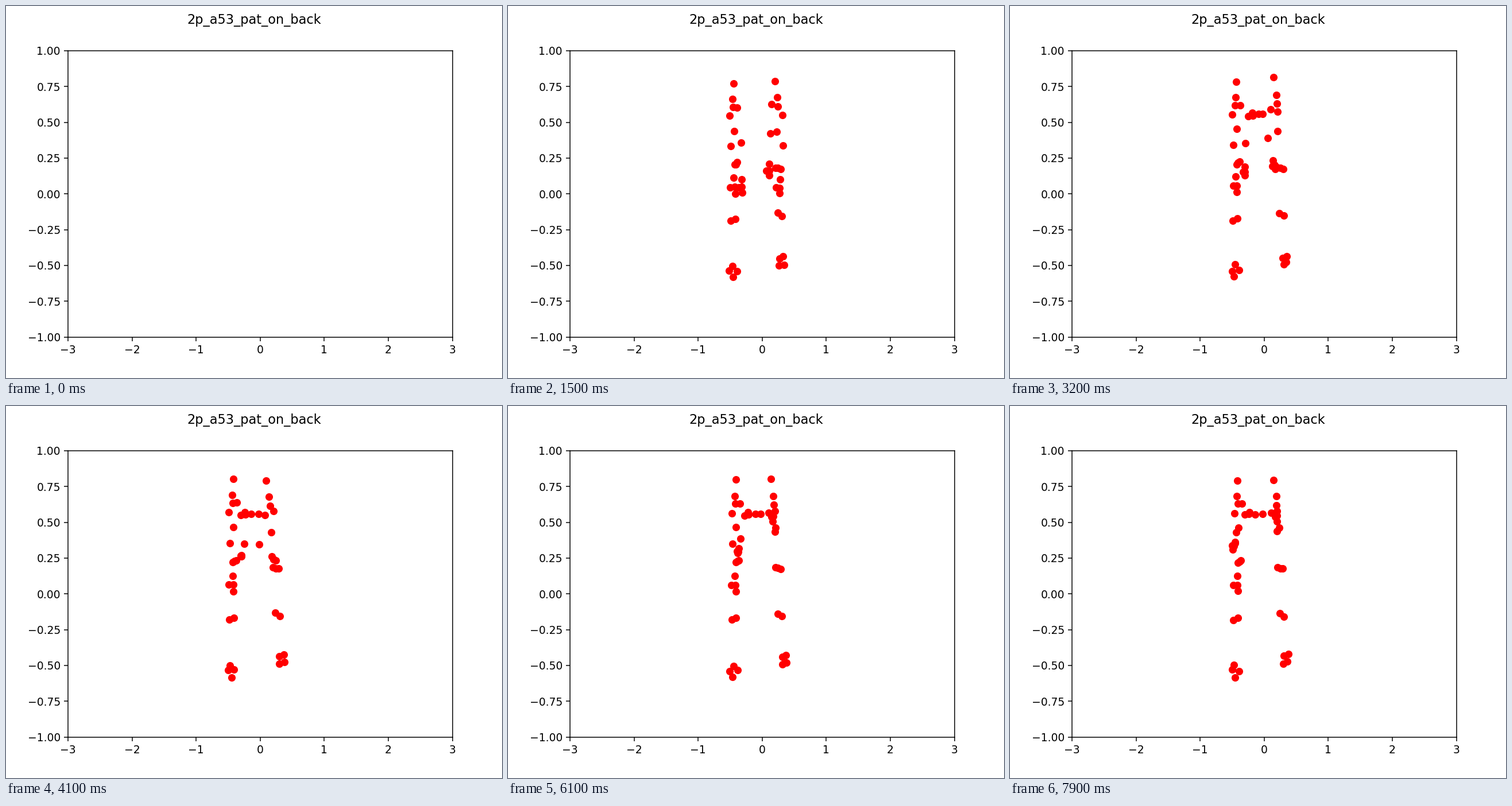
Write a matplotlib script that moves like this. It is 864 by 648 pixels and loops after 8000 ms.

```python
import numpy as np
import matplotlib.pyplot as plt
from matplotlib.animation import FuncAnimation

FRAMES, INTERVAL = 80, 100
JOINTS = 50

rng = np.random.default_rng(53)
tempo = rng.uniform(4, 11, (JOINTS, 2))
phase = rng.uniform(0, 2 * np.pi, (JOINTS, 2))


def glide(t, *keys):
    """Ease through (time, value, ...) keys and hold at both ends."""
    times = np.array([k[0] for k in keys])
    values = [np.hstack(k[1:]).astype(float) for k in keys]
    i = int(np.clip(np.searchsorted(times, t) - 1, 0, len(keys) - 2))
    u = np.clip((t - times[i]) / (times[i + 1] - times[i]), 0, 1)
    u = u * u * (3 - 2 * u)
    return values[i] + (values[i + 1] - values[i]) * u


def lean(points, shift, foot, span):
    """Shift points in proportion to their height above the foot line."""
    points = np.array(points, float)
    weight = np.clip((foot - points[:, 1:]) / span, 0, 1)
    return points + weight * shift


def hips(a, b):
    return [a, ((a[0] + b[0]) / 2, (a[1] + b[1]) / 2), b]


def arm(shoulder, elbow, hand, reach):
    """Shoulder, elbow, and a wrist, hand, fingertip and thumb along the forearm."""
    way = (hand - elbow) / np.hypot(*(hand - elbow))
    side = np.array([-way[1], way[0]])
    return [shoulder, elbow, hand - reach * way, hand,
            hand + 0.7 * reach * way, hand + 0.4 * reach * side]


def keyed_arm(t, *keys):
    v = glide(t, *keys)
    return v[:2], v[2:4], v[4:6], v[6]


def left_figure(t):
    shift = glide(t, (2.4, 0, 0), (4.2, 2.5, -7), (5.2, 4, -6))
    body = lean([(393, 135), (391, 162), (392, 176), (394, 217),
                 *hips((394, 277), (399, 273)),
                 (388, 375), (396, 371),
                 (391, 452), (385.5, 461), (398, 461), (391.5, 471.5)],
                shift, 470, 280)
    far = lean([(386, 192), (388, 244), (394, 315)], shift, 470, 280)
    raised = (414.5, 240.5), (410, 261), 2
    near = keyed_arm(t, (2.4, (399, 177), (406.5, 238), (408, 316), 14),
                     (4.0, (402, 168), *raised),
                     (5.4, (404, 169), *raised),
                     (6.9, (404.5, 170), (394, 220), (390, 244), 8))
    return np.vstack([body, arm(*far, 16), arm(*near)])


def right_figure(t):
    shift = glide(t, (1.5, 0, 0), (3.0, -5, -6), (4.1, -12, -1),
                  (5.3, -9, -4), (6.9, -6, -2))
    body = lean([(465.5, 130.5), (468.5, 159), (469, 174.5), (468, 220),
                 *hips((465.5, 281), (475.5, 284)),
                 (469, 361), (477, 366)], shift, 290, 150)
    feet = np.array([(473, 440), (480, 437), (473, 453), (480, 450)])
    feet = feet + glide(t, (1.5, 0, 0), (4.1, 4, -4))
    resting = keyed_arm(t, (2.4, (458.5, 171.5), (457, 221), (455, 287), 12),
                        (4.1, (451, 190), (441, 240.5), (467, 266), 5),
                        (5.3, (453, 185), (461, 214), (456, 194), 7),
                        (6.9, (455, 185.5), (469, 212), (462, 193), 8))
    shoulder, elbow, hand, reach = keyed_arm(
        t, (1.8, (477, 190), (479, 243), (473, 317), 14),
        (2.4, (472, 185), (457.5, 223), (433, 232), 8),
        (3.0, (466, 183), (440, 187.5), (419, 189.5), 11))
    # Light pats once the hand has reached the other back
    if t > 3:
        hand = hand + np.array([4, 1]) * np.sin(2 * np.pi * (t - 3) / 1.25)
    return np.vstack([body, feet, arm(*resting), arm(shoulder, elbow, hand, reach)])


def tremble(t, points):
    """Sensor jitter, stronger near the floor."""
    size = np.where(points[:, 1:] > 420, 1.5, 0.6)
    return points + size * np.sin(tempo * t + phase)


fig, ax = plt.subplots(figsize=(6.4, 4.8), dpi=135)
fig.suptitle("2p_a53_pat_on_back", fontsize=12)
ax.set(xlim=(-3, 3), ylim=(-1, 1))
dots, = ax.plot([], [], "ro", markersize=6)


def clear():
    dots.set_data([], [])
    return dots,


def draw(frame):
    if frame == 0:
        return clear()
    t = frame * INTERVAL / 1000
    x, y = tremble(t, np.vstack([left_figure(t), right_figure(t)])).T
    # Stage pixels to axes units
    dots.set_data((x - 442.8) / 111.6, (327.24 - y) / 249.48)
    return dots,


anim = FuncAnimation(fig, draw, frames=FRAMES, init_func=clear,
                     interval=INTERVAL, repeat=True, repeat_delay=0)
plt.show()
```
